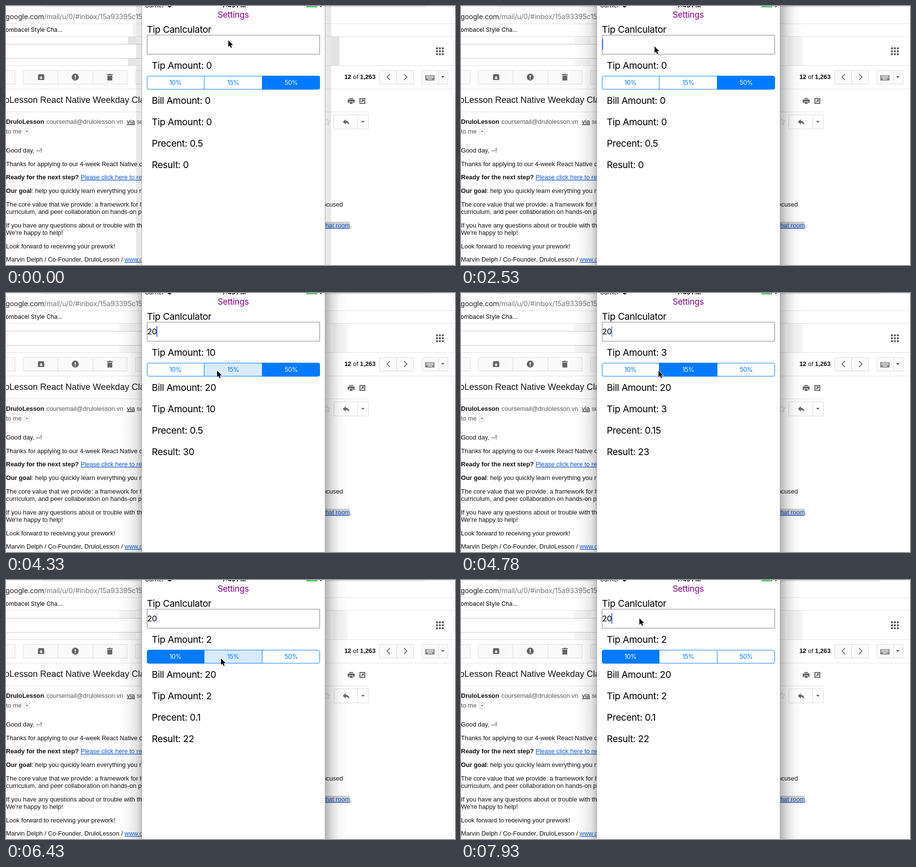
Recreate the animation shown at these times as an HTML page. Size 921x532 px, loop 8 s.

```html
<!DOCTYPE html>
<html lang="en">
<head>
<meta charset="utf-8">
<title>Tip calculator demo</title>
<style>
  html, body { margin: 0; width: 100%; height: 100%; overflow: hidden; background: #fff; }
  svg { display: block; }
  text { white-space: pre; }
  .mail { font: 12.8px "Liberation Sans", Arial, sans-serif; fill: #111; }
  .subject { font-size: 18px; }
  .b { font-weight: bold; }
  .a { fill: #15c; text-decoration: underline; }
  .grey { fill: #555; }
  .ui { font-family: Inter, Roboto, sans-serif; }
  .app { font-size: 19.2px; letter-spacing: -.35px; }
  .rule { stroke: #e2e2e2; fill: none; }
  .btn { fill: #fafafa; stroke: #dcdcdc; }
  .ico { fill: #666; }
  .line { fill: none; stroke: #777; stroke-width: 2; }
  #labels text { font-size: 12.8px; letter-spacing: -.4px; text-anchor: middle; }
</style>
</head>
<body>
<svg width="921" height="532" viewBox="0 0 921 532">
  <defs>
    <linearGradient id="left"><stop offset="0" stop-opacity="0"/><stop offset=".4" stop-opacity=".03"/><stop offset=".75" stop-opacity=".1"/><stop offset="1" stop-opacity=".24"/></linearGradient>
    <linearGradient id="right" x1="1" x2="0"><stop offset="0" stop-opacity="0"/><stop offset=".35" stop-opacity=".03"/><stop offset=".66" stop-opacity=".12"/><stop offset="1" stop-opacity=".3"/></linearGradient>
    <path id="down" d="M-3.5-2h7L0 2z"/>
  </defs>

  <!-- browser chrome -->
  <path fill="#dadada" d="M0 0H921V1H0z"/>
  <path fill="#eee" d="M75 1H860V3H75z"/>
  <path class="rule" d="M0 36.5H921M0 62.5H921M0 122.5H921M0 170.5H921M0 217.5H744"/>
  <text class="ui" x="-1" y="27" font-size="14.500" letter-spacing="-.2" fill="#777"><tspan fill="#222">google.com</tspan>/mail/u/0/#inbox/15a93395c15</text>
  <text class="ui" x="-1" y="53" font-size="12">ombacel Style Cha...</text>
  <path stroke="#c8c8c8" d="M0 78.5H279M0 107.5H279"/>

  <!-- mail toolbar -->
  <g class="btn">
    <path d="M-5 132.5H18.5V160.5H-5zM35.5 132.5H248.5V160.5H35.5zM106.5 132.5V160.5M178.5 132.5V160.5M265.5 132.5H300V160.5H265.5z"/>
    <path d="M766.5 132.5H836.5V160.5H766.5zM801.5 132.5V160.5M853.5 132.5H906.5V160.5H853.5zM887.5 132.5V160.5"/>
    <path fill="#fff" d="M672.5 223.5H743.5V252.5H672.5zM721.5 223.5V252.5M37.5 252.5H48.5V263.5H37.5z"/>
  </g>
  <g class="ico">
    <path fill-rule="evenodd" d="M67 140H77L78.500 142.500V152H65.500V142.500zM71 144V147H68.500L72 150.500 75.500 147H73V144z"/>
    <circle cx="142" cy="146" r="7.200"/>
    <path fill="#fff" d="M141 142H143V147H141zM141 148.500H143V150.500H141z"/>
    <path d="M207 140H211L212 139H214L215 140H219V142H207zM208 143H218V153H208z"/>
    <path fill-rule="evenodd" d="M860 142H879V153H860zM862 143.500V145H877V143.500zM862 146.500V148H877V146.500zM865 149.500V151H874V149.500z" opacity=".8"/>
    <path d="M704 189H712V191H704zM701 192H715V199H712V196H704V199H701zM705 197H711V201H705z"/>
    <path fill-rule="evenodd" d="M725 189H737V201H725zM727 191V199H735V191z"/>
    <path d="M729 192H734V197L732.500 195.500 729.500 198 728 196.500 731 194z"/>
    <path d="M691 238L697 232.500V236Q704 236 704 244Q701 240 697 240V243.500z"/>
    <use href="#down" x="896" y="146"/><use href="#down" x="732" y="238"/>
    <use href="#down" transform="translate(43 258) scale(.75)"/>
    <g id="grid"></g>
  </g>
  <path class="line" d="M787.500 140L781.500 146 787.500 152M816.500 140L822.500 146 816.500 152"/>
  <path fill="none" stroke="#ccc" d="M658 231L660 236H665L661 239.500 662.500 244 658 241.500 653.500 244 655 239.500 651 236H656z"/>

  <!-- mail text -->
  <g class="mail">
    <text x="694" y="150"><tspan class="b">12</tspan> of <tspan class="b">1,263</tspan></text>
    <text class="subject" x="-3" y="199">oLesson React Native Weekday Classes</text>
    <text class="b" y="242">DruloLesson</text>
    <text class="grey" x="83" y="242">coursemail@drulolesson.vn</text>
    <text x="248" y="242"><tspan text-decoration="underline">via</tspan><tspan class="grey"> sender</tspan></text>
    <text class="grey" y="262">to me</text>
    <text y="301">Good day, --!</text>
    <text y="329">Thanks for applying to our 4-week React Native course</text>
    <text y="356"><tspan class="b">Ready for the next step?</tspan> <tspan class="a">Please click here to review</tspan></text>
    <text y="384"><tspan class="b">Our goal</tspan>: help you quickly learn everything you need</text>
    <text y="412">The core value that we provide: a framework for hands</text>
    <text x="691" y="412" text-anchor="end">focused</text>
    <text y="427">curriculum, and peer collaboration on hands-on projects</text>
    <text y="455">If you have any questions about or trouble with the form</text>
    <path fill="#d0d0d0" d="M640 443H705V458H640z"/>
    <text x="709" y="455" text-anchor="end"><tspan class="a">chat room</tspan>.</text>
    <text y="470">We're happy to help!</text>
    <text y="498">Look forward to receiving your prework!</text>
    <text y="525">Marvin Delph / Co-Founder, DruloLesson / <tspan class="a">www.drulolesson.vn</tspan></text>
  </g>

  <!-- window shadow, before and after the window gets focus -->
  <g id="idle">
    <path fill-opacity=".09" d="M267 0H279V532H267zM654 0H667V532H654z"/>
    <path fill-opacity=".11" d="M250 63H267V78H250zM250 108H267V122H250zM667 63H684V122H667z"/>
    <path fill-opacity=".05" d="M260 37H267V62H260z"/>
  </g>
  <g id="focus">
    <path fill="url(#left)" d="M232 0H279V532H232z"/>
    <path fill="url(#right)" d="M654 0H701V532H654z"/>
    <path fill-opacity=".04" d="M232 63H267V78H232zM232 108H267V122H232zM670 63H701V122H670z"/>
  </g>

  <!-- phone -->
  <path fill="#aaa" d="M278 0H655V532H278z"/>
  <path fill="#fff" d="M279 0H654V532H279z"/>
  <g class="ui">
    <text x="285" y="2.500" font-size="12">Carrier</text>
    <path d="M331 0H340L335.500 3.500z"/>
    <text x="468" y="2.500" font-size="12" font-weight="600" text-anchor="middle">7:43 PM</text>
    <path fill="#4cd964" stroke="#777" stroke-width=".6" d="M616.500-5H638V2.500H616.500z"/>
    <path d="M645 0H648L645 3z"/>
    <text x="466" y="24" font-size="17.300" letter-spacing="-.3" text-anchor="middle" fill="#800080">Settings</text>
    <g class="app">
      <text x="289" y="55">Tip Canlculator</text>
      <text class="row" x="299" y="129"></text>
      <text class="row" x="299" y="201"></text>
      <text class="row" x="299" y="245"></text>
      <text class="row" x="299" y="289"></text>
      <text class="row" x="299" y="333"></text>
    </g>
    <path fill="none" stroke="#808080" d="M289.500 60H643.500V99H289.500z"/>
    <text id="input" x="289.500" y="85" font-size="16.500" letter-spacing="-.4"></text>
    <rect id="caret" y="68" width="2" height="22" fill="#426bf2"/>
    <g id="fills" fill="#007aff">
      <path d="M406.500 143.500H293a4 4 0 0 0-4 4V167.500a4 4 0 0 0 4 4H406.500z"/>
      <path d="M406.500 143.500H525.500V171.500H406.500z"/>
      <path d="M525.500 143.500H640a4 4 0 0 1 4 4V167.500a4 4 0 0 1-4 4H525.500z"/>
    </g>
    <rect x="289.500" y="144" width="354" height="27" rx="3.500" fill="none" stroke="#007aff"/>
    <path stroke="#007aff" d="M406.500 144V171M525.500 144V171"/>
    <g id="labels">
      <text x="347.500" y="162">10%</text><text x="466" y="162">15%</text><text x="585" y="162">50%</text>
    </g>
  </g>
  <path id="cursor" stroke="#fff" stroke-width="1.400" paint-order="stroke" d="M0 0V13.500L3.100 10.600 5.200 15.400 7.300 14.400 5.300 9.800H9.500z"/>
</svg>
<script>
const $ = id => document.getElementById(id);
const rows = document.querySelectorAll('.row');
const fills = $('fills').children, labels = $('labels').children;
const LOOP = 8000, TICK = 150, FOCUS = 9, TYPED = 19;
const rates = [.1, .15, .5];
const clicks = [[30, 1], [36, 0], [44, 1], [51, 0]];   // tick, segment
const path = [                                         // tick, x, y
  [0, 456, 70.5], [8, 394, 78.5], [10, 394, 78.5], [15, 397, 83], [22, 397, 83],
  [27, 433, 159.5], [30, 433, 159.5], [35, 354, 159.5], [38, 354, 159.5],
  [42, 441, 161], [45, 441, 161], [48, 355, 164], [51, 355, 164], [53, 366, 78.5]
];

for (let i = 0; i < 9; i++)
  $('grid').innerHTML += `<rect x="${882 + i % 3 * 6}" y="${85 + (i / 3 | 0) * 6}" width="4" height="4"/>`;

function cursorAt(tick) {
  const i = path.findIndex(p => p[0] >= tick);
  const [t1, x1, y1] = path[i], [t0, x0, y0] = path[Math.max(0, i - 1)];
  const u = t1 > t0 ? (tick - t0) / (t1 - t0) : 1;
  const e = u * u * (3 - 2 * u);
  return [x0 + (x1 - x0) * e, y0 + (y1 - y0) * e];
}

function caretOpacity(tick) {
  if (tick < FOCUS) return 0;
  const age = (tick - (tick < TYPED ? FOCUS : TYPED)) * TICK % 1000;
  return age <= 500 ? 1 : Math.max(0, 1 - (age - 500) / 150, (age - 850) / 150);
}

function drawSegments(tick) {
  let selected = 2;
  const fill = [0, 0, 1], white = [0, 0, 1], alpha = [1, 1, 1];
  for (const [at, next] of clicks) {
    if (tick === at - 1) fill[next] = .15;
    if (tick < at) break;
    const fading = tick === at;
    fill[selected] = fading && selected < 2 ? .6 : 0;
    white[selected] = +(fading && selected < 2);
    alpha[selected] = white[selected] ? .35 : 1;
    fill[next] = fading ? .5 : 1;
    white[next] = 1;
    alpha[next] = fading ? .08 : 1;
    selected = next;
  }
  for (let i = 0; i < 3; i++) {
    fills[i].style.opacity = fill[i];
    labels[i].style.fill = white[i] ? '#fff' : '#007aff';
    labels[i].style.opacity = alpha[i];
  }
  return rates[selected];
}

function draw() {
  const tick = Math.floor((performance.now() % LOOP + 20) / TICK);
  const rate = drawSegments(tick);
  const bill = tick < TYPED - 1 ? 0 : tick < TYPED ? 2 : 20;
  const tip = bill * rate;
  [`Tip Amount: ${tip}`, `Bill Amount: ${bill}`, `Tip Amount: ${tip}`, `Precent: ${rate}`, `Result: ${bill + tip}`]
    .forEach((s, i) => rows[i].textContent = s);
  $('input').textContent = bill || '';
  $('caret').setAttribute('x', bill ? 289 + 9.7 * String(bill).length : 289.5);
  $('caret').style.opacity = caretOpacity(tick);
  $('idle').style.display = tick < FOCUS ? '' : 'none';
  $('focus').style.display = tick < FOCUS ? 'none' : '';
  $('cursor').setAttribute('transform', `translate(${cursorAt(Math.min(tick, 53))})`);
  requestAnimationFrame(draw);
}
draw();
</script>
</body>
</html>
```
